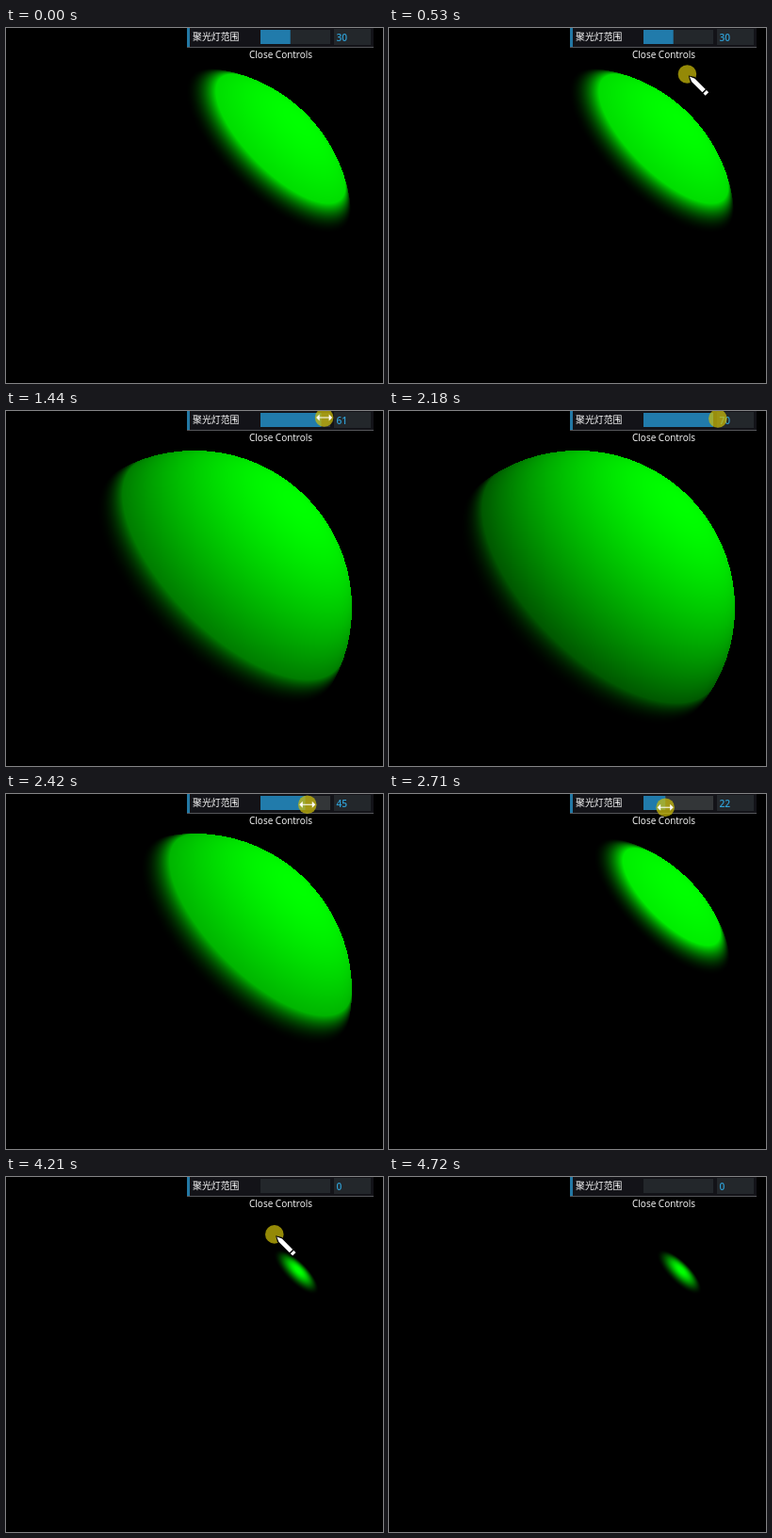
These frames come from a looping animation (400 by 377 pixels, 5190 ms). An HTML page with a canvas:

```html
<!DOCTYPE html>
<html lang="zh">
<head>
<meta charset="utf-8">
<title>Spotlight range</title>
<style>
html, body { margin: 0; width: 100%; height: 100%; overflow: hidden; background: #000; }
canvas { display: block; width: 400px; height: 377px; }
</style>
</head>
<body>
<canvas id="stage" width="400" height="377"></canvas>
<script>
const ctx = document.getElementById('stage').getContext('2d');
const LOOP = 5190;
const BALL = { x: 200, y: 209, r: 167 };
const EYE = 5;
const LIGHT = [0.602, 0.602, 0.525];
const PENUMBRA = 10;
const SLIDER = { x: 270, w: 74, max: 70 };
const FONT = '"Open Sans", "Noto Sans", sans-serif';
const CJK = '"Noto Sans CJK SC", "Noto Sans CJK JP", "Noto Sans CJK", sans-serif';

const linear = p => p;
const easeOut = p => 1 - (1 - p) * (1 - p);
const CORNER = { x: 410, y: 388 };
const MOVES = [
  { start: 110, end: 750, x: 304, y: 4, ease: easeOut },
  { start: 1060, end: 1570, x: 349, y: 8, ease: linear },
  { start: 2180, end: 3380, x: 268, y: 17, ease: easeOut },
  { start: 4140, end: 4740, ...CORNER, ease: linear }
];
const PRESS = 1030;

const rad = deg => deg * Math.PI / 180;
const clamp = (v, lo, hi) => Math.min(hi, Math.max(lo, v));
const progress = (t, start, end) => clamp((t - start) / (end - start), 0, 1);

function pointerAt(t) {
  let { x, y } = CORNER;
  for (const m of MOVES) {
    const p = m.ease(progress(t, m.start, m.end));
    x += (m.x - x) * p;
    y += (m.y - y) * p;
  }
  return { x, y };
}

function valueAt(t) {
  if (t < PRESS) return 30;
  const up = 29 + 41 * progress(t, 1070, 1545);
  return Math.round(up * (1 - easeOut(progress(t, 2180, 3380))));
}

// Cosine between surface normal and light for each pixel of the ball
const size = BALL.r * 2;
const facing = new Float32Array(size * size);
const focal = Math.sqrt(EYE * EYE - 1);
for (let j = 0; j < size; j++) {
  for (let i = 0; i < size; i++) {
    const u = (i + 0.5 - BALL.r) / BALL.r / focal;
    const v = (BALL.r - j - 0.5) / BALL.r / focal;
    const a = u * u + v * v + 1;
    const disc = EYE * EYE - a * (EYE * EYE - 1);
    if (disc < 0) continue;
    const s = (EYE - Math.sqrt(disc)) / a;
    facing[j * size + i] = u * s * LIGHT[0] + v * s * LIGHT[1] + (EYE - s) * LIGHT[2];
  }
}

const image = ctx.createImageData(size, size);
for (let i = 3; i < image.data.length; i += 4) image.data[i] = 255;
let litFor = -1;

function drawBall(value) {
  if (value !== litFor) {
    const inner = Math.cos(rad(value));
    const outer = Math.cos(rad(value + PENUMBRA));
    facing.forEach((d, i) => {
      const k = clamp((d - outer) / (inner - outer), 0, 1);
      image.data[i * 4 + 1] = 255 * d * k * k;
    });
    litFor = value;
  }
  ctx.putImageData(image, BALL.x - BALL.r, BALL.y - BALL.r);
}

function box(color, x, y, w, h) {
  ctx.fillStyle = color;
  ctx.fillRect(x, y, w, h);
}

function label(text, x, y, font, color) {
  ctx.font = font;
  ctx.fillStyle = color;
  ctx.fillText(text, x, y);
}

function drawPanel(value, hover) {
  box('#131318', 192, 0, 198, 20);
  box('#55565a', 192, 20, 198, 1);
  box('#2378a4', 192, 0, 3, 20);
  box(hover ? '#333638' : '#23272b', SLIDER.x, 2, SLIDER.w, 15);
  box('#217bab', SLIDER.x, 2, SLIDER.w * value / SLIDER.max, 15);
  box('#23272b', 348, 1, 39, 17);
  label('聚光灯范围', 198, 13, '9.9px ' + CJK, '#fff');
  label(value, 350.5, 14, '600 10.2px ' + FONT, '#2f9fd4');
  label('Close Controls', 258, 32, '500 10px ' + FONT, '#fff');
}

function polygon(points, fill) {
  ctx.beginPath();
  points.forEach(([x, y]) => ctx.lineTo(x, y));
  ctx.closePath();
  ctx.fillStyle = fill;
  ctx.fill();
}

function drawArrows() {
  box('#fff', -6, -0.5, 12, 1);
  for (const side of [-1, 1]) {
    polygon([[side * 8.5, 0], [side * 5, -3.5], [side * 5, 3.5]], '#fff');
  }
}

function drawPencil() {
  ctx.rotate(Math.PI / 4);
  polygon([[2, 0], [8, -3.6], [31, -3.6], [31, 3.6], [8, 3.6]], '#000');
  polygon([[3.5, 0], [9, -2.4], [25, -2.4], [25, 2.4], [9, 2.4]], '#fff');
  box('#fff', 26.5, -2.4, 3.2, 4.8);
}

function drawPointer({ x, y }, sliding) {
  ctx.save();
  ctx.translate(x, y);
  ctx.beginPath();
  ctx.arc(0, 0, 9.8, 0, Math.PI * 2);
  ctx.fillStyle = 'rgba(205, 190, 10, 0.72)';
  ctx.fill();
  if (sliding) drawArrows();
  else if (y > 18 || x < SLIDER.x) drawPencil();
  ctx.restore();
}

function draw(t) {
  const pointer = pointerAt(t);
  const value = valueAt(t);
  const sliding = pointer.y < 18 && pointer.x >= SLIDER.x && pointer.x < 346;
  box('#000', 0, 0, 400, 377);
  drawBall(value);
  drawPanel(value, sliding);
  if (t >= 120 && t < 4720) drawPointer(pointer, sliding);
}

function tick() {
  draw(performance.now() % LOOP);
  requestAnimationFrame(tick);
}
tick();
</script>
</body>
</html>
```
